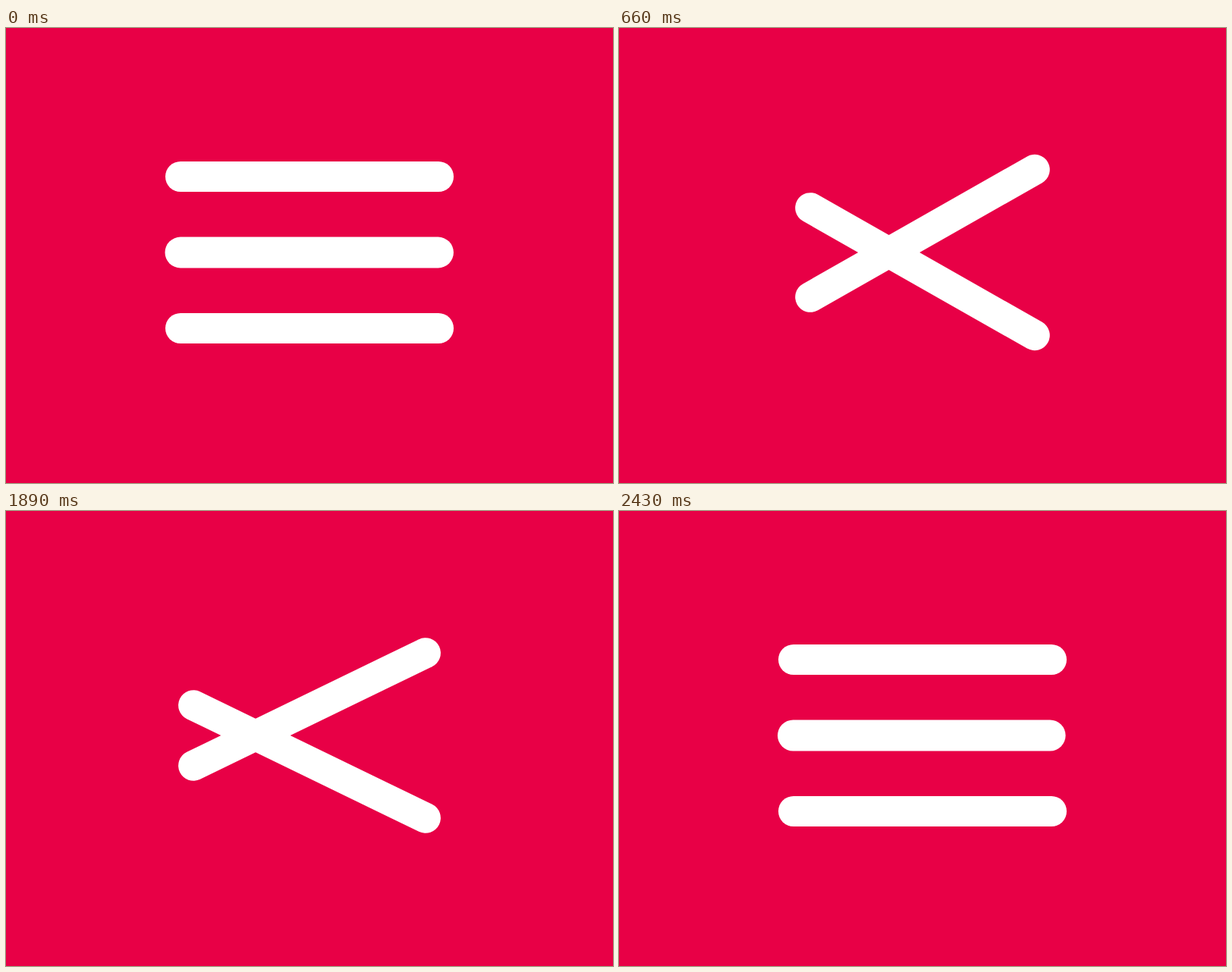
Write an HTML page that moves like this. It is 800 px wide and 600 px high and loops after 3.6 s.

```html
<!DOCTYPE html>
<html lang="en">
<head>
<meta charset="utf-8">
<title>Menu toggle</title>
<style>
  html, body { margin: 0; width: 100%; height: 100%; overflow: hidden; background: #e80046; }
  svg { display: block; width: 800px; height: 600px; fill: #fff; }
</style>
</head>
<body>
<svg viewBox="0 0 800 600">
  <rect id="top" x="-190" y="-20" width="380" height="40" rx="20"/>
  <rect id="middle"/>
  <rect id="bottom" x="-190" y="-20" width="380" height="40" rx="20"/>
</svg>
<script>
const LOOP = 3600, STEP = 30;
const [topBar, middle, bottomBar] = ['top', 'middle', 'bottom'].map(id => document.getElementById(id));

// Middle bar states: centre x, width, height
const OPEN = [399.7, 380.4, 40.8];
const DOT = [401.5, 11, 11];
const REOPENED = [398.8, 379.6, 41];

// Eased progress from time a to time b
function ease(t, a, b) {
  const x = Math.min(1, Math.max(0, (t - a) / (b - a)));
  return x * x * (3 - 2 * x);
}

function drawMiddle(from, to, p) {
  const [cx, w, h] = from.map((v, i) => v + (to[i] - v) * p);
  const attrs = { x: cx - w / 2, y: 296 - h / 2, width: w, height: h, rx: Math.min(w, h) / 2 };
  for (const name in attrs) middle.setAttribute(name, attrs[name]);
}

function draw(t) {
  const cross = ease(t, 360, 810) - ease(t, 1710, 2160);
  const shift = 101 * cross, turn = 40 * cross;
  topBar.setAttribute('transform', `translate(400 ${196 + shift}) rotate(${-turn})`);
  bottomBar.setAttribute('transform', `translate(400 ${396 - shift}) rotate(${turn})`);

  middle.setAttribute('visibility', t > 360 && t < 2160 ? 'hidden' : 'visible');
  if (t <= 360) drawMiddle(OPEN, DOT, ease(t, 0, 360));
  else drawMiddle(DOT, REOPENED, ease(t, 2160, 2430));
}

const start = performance.now();
function tick() {
  const t = (performance.now() - start) % LOOP;
  draw(Math.floor(t / STEP) * STEP);
  requestAnimationFrame(tick);
}
tick();
</script>
</body>
</html>
```
